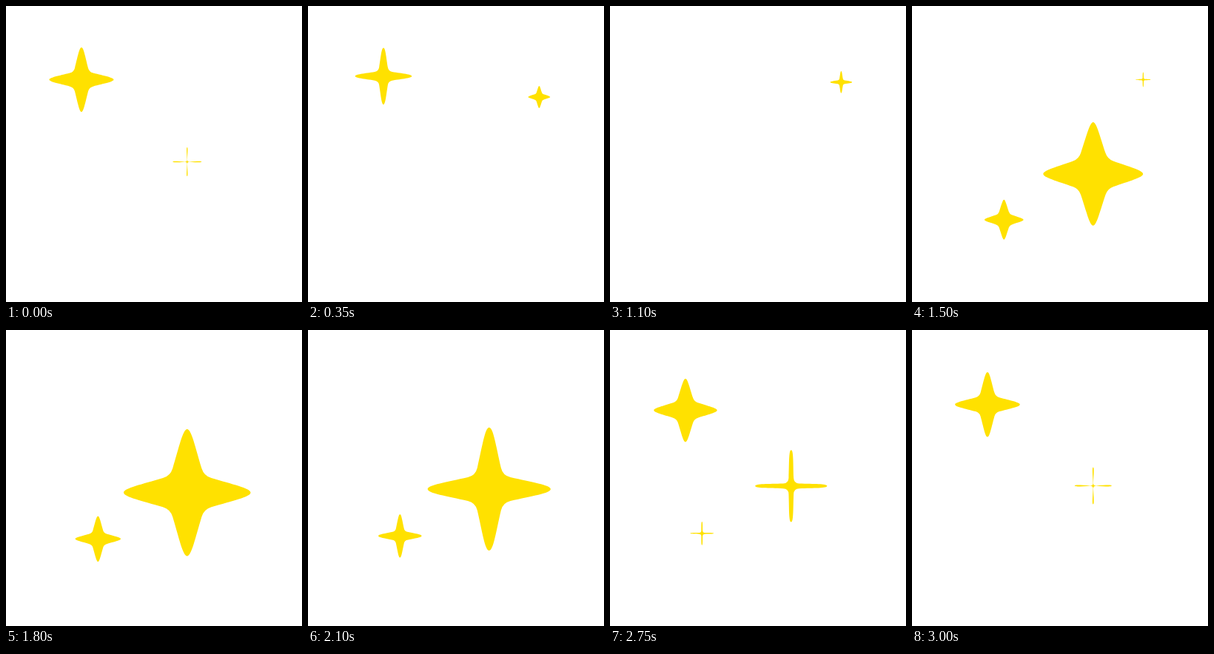
Write an HTML page that moves like this. It is 400 px wide and 400 px high and loops after 3050 ms.

```html
<!DOCTYPE html>
<html lang="en">
<head>
<meta charset="utf-8">
<title>Sparkles</title>
<style>
  html, body { margin: 0; width: 100%; height: 100%; overflow: hidden; background: #fff; }
  svg { display: block; width: 100vw; height: 100vh; fill: #ffe100; }
</style>
</head>
<body>
<svg id="stage" viewBox="0 0 400 400"></svg>
<script>
const LOOP = 3050, STEP = 50;

// x, resting y, distance risen, easing power, full radius, birth time
const stars = [
  { x: 102, y: 93, rise: 49, power: 4, size: 44, birth: 2230 },
  { x: 244.8, y: 210.5, rise: 28, power: 3.1, size: 86, birth: 1170 },
  { x: 124.3, y: 274.6, rise: 26.5, power: 3.1, size: 30.8, birth: 1120 },
  { x: 312.4, y: 98.8, rise: 46, power: 3, size: 16.8, birth: -50 }
];

const svg = document.getElementById('stage');
for (const star of stars) {
  star.path = document.createElementNS('http://www.w3.org/2000/svg', 'path');
  svg.append(star.path);
}

const progress = (t, from, length) => Math.min(1, Math.max(0, (t - from) / length));
const easeOut = (u, power) => 1 - (1 - u) ** power;

// Four tapered arms joined by soft inner corners; core is the corner's distance from the centre.
function sparkle(cx, cy, w, h, core) {
  const tip = 0.068, edge = 0.04;
  const along = f => [core + f * (edge - core), -core - f * (1 - core)];
  const mirror = ([x, y]) => [-y, -x];
  const near = along(0.16), far = along(0.6);
  let d = '';
  for (let turn = 0; turn < 4; turn++) {
    const at = ([x, y]) => {
      for (let i = 0; i < turn; i++) [x, y] = [-y, x];
      return `${(cx + x * w).toFixed(2)} ${(cy + y * h).toFixed(2)} `;
    };
    if (!turn) d += 'M' + at([0, -1]);
    d += 'C' + [[tip, -1], far, near].map(at).join('');
    d += 'Q' + [[core, -core], mirror(near)].map(at).join('');
    d += 'C' + [mirror(far), [1, -tip], [1, 0]].map(at).join('');
  }
  return d + 'Z';
}

function draw(time) {
  for (const s of stars) {
    const t = (time - s.birth + LOOP) % LOOP;
    const r = s.size * (1 - progress(t, 680, 1365) ** 2);
    const w = r * easeOut(progress(t, 70, 650), 3);
    const h = r * easeOut(progress(t, 30, 700), 3);
    const core = 0.29 * (1 - progress(t, 230, 1600) ** 1.75);
    const y = s.y + s.rise * (1 - progress(t, 0, 2080)) ** s.power;
    const visible = w * (0.04 + core) > 0.4;
    s.path.setAttribute('d', visible ? sparkle(s.x, y, w, h, core) : '');
  }
}

const start = performance.now();
function frame() {
  const time = (performance.now() - start) % LOOP;
  draw(Math.floor(time / STEP) * STEP);
  requestAnimationFrame(frame);
}
frame();
</script>
</body>
</html>
```
